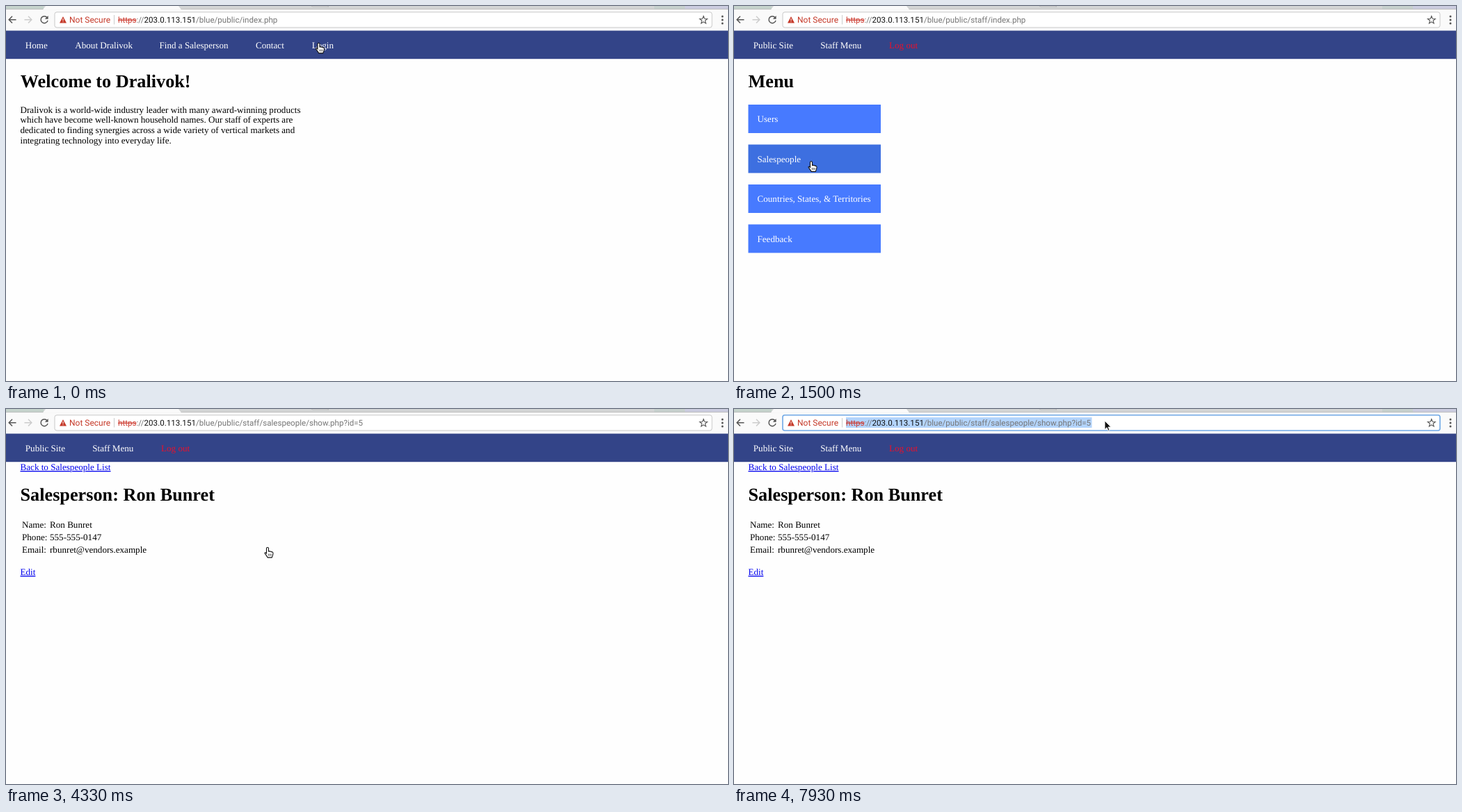
Write an HTML page that moves like this. It is 1038 by 540 pixels and loops after 8 s.

```html
<!DOCTYPE html>
<html lang="en">
<head>
<meta charset="utf-8">
<title>Staff site walkthrough</title>
<style>
  html, body { margin: 0; width: 100%; height: 100%; overflow: hidden; background: #fefefe; }
  svg { display: block; width: 1038px; height: 540px; }
  text { font: 13.12px "Liberation Serif", "Times New Roman", serif; text-rendering: geometricPrecision; white-space: pre; }
  .h1 { font-size: 26.24px; font-weight: bold; }
  .th { font-weight: bold; text-anchor: middle; }
  .nav { fill: #fff; }
  .out { fill: #e8112d; }
  .link { fill: #00e; text-decoration: underline; }
  .ui { font: 11.6px Roboto, "Liberation Sans", sans-serif; fill: #757575; }
  .ui .bad { fill: #cc3a2f; text-decoration: line-through; }
  .ui .host { fill: #111; }
  .warn { font-size: 12px; fill: #c53929; }
</style>
</head>
<body>
<svg id="stage" viewBox="0 0 1038 540"></svg>
<script>
const stage = document.getElementById('stage');
const text = (x, y, s, cls = '') => `<text x="${x}" y="${y}" class="${cls}">${s}</text>`;
const rect = (x, y, w, h, fill, extra = '') =>
  `<rect x="${x}" y="${y}" width="${w}" height="${h}" fill="${fill}" ${extra}/>`;
const line = (d, color, width = 1.5) => `<path d="${d}" fill="none" stroke="${color}" stroke-width="${width}"/>`;
const group = (id, body) => `<g id="${id}">${body}</g>`;

const star = Array.from({ length: 10 }, (_, i) => {
  const r = i % 2 ? 2.5 : 5.8, a = i * Math.PI / 5;
  return `${1002.8 + r * Math.sin(a)},${20.3 - r * Math.cos(a)}`;
}).join(' ');

const toolbar =
  rect(0, 0, 1038, 36, '#fafafa') +
  rect(0, 0, 1038, 4.5, '#d3d5d5') + rect(0, 0, 54, 4.5, '#c5d3cc') +
  rect(932, 0, 44, 4.5, '#c6d0cd') + rect(976, 0, 62, 4.5, '#cbccdf') +
  line('M0 4.6H1038', '#b4b4b4', .8) +
  '<path d="M53 5.2L57 0H248L252 5.2z" fill="#fafafa"/>' +
  '<path d="M439 0H462L464 1H441z" fill="#eee" stroke="#aaa" stroke-width=".6"/>' +
  line('M14.5 19.7H4.5M9 14.8L4.2 19.7L9 24.6', '#555') +
  line('M26.5 19.7H36.5M32 14.8L36.8 19.7L32 24.6', '#ccc') +
  line('M59 16.5A5 5 0 1 0 60 20.8', '#555') +
  '<path d="M60.6 14V18.8H55.8z" fill="#555"/>' +
  rect(70, 8.8, 945, 22.2, '#fff', 'id="field" rx="3" stroke="#c8c8c8"') +
  rect(161, 12, 353.5, 15, '#b3d4fc', 'id="urlSel"') +
  '<path d="M82 15L87 24.5H77z" fill="#c53929"/>' + line('M82 18V21.3M82 22.3V23.3', '#fff', 1) +
  text(91, 24, 'Not Secure', 'ui warn') + line('M155.5 13V26.5', '#ccc', 1) +
  '<text x="161" y="24" class="ui"><tspan class="bad">https</tspan>://' +
  '<tspan class="host">203.0.113.151</tspan><tspan id="path"></tspan></text>' +
  `<polygon points="${star}" fill="none" stroke="#555" stroke-width="1.1"/>` +
  [15, 20, 25].map(y => `<circle cx="1030" cy="${y}" r="1.5" fill="#555"/>`).join('') +
  rect(0, 35.5, 1038, 40.7, '#334488');

const navBar = items => items.map(([x, s, cls = 'nav']) => text(x, 61, s, cls)).join('');
const staffNav = navBar([[27.8, 'Public Site'], [124.3, 'Staff Menu'], [223, 'Log out', 'out']]);

const home =
  navBar([[27.8, 'Home'], [99.3, 'About Dralivok'], [220.5, 'Find a Salesperson'], [359, 'Contact'], [439.7, 'Login']]) +
  text(20.8, 117, 'Welcome to Dralivok!', 'h1') +
  ['Dralivok is a world-wide industry leader with many award-winning products',
   'which have become well-known household names. Our staff of experts are',
   'dedicated to finding synergies across a wide variety of vertical markets and',
   'integrating technology into everyday life.'].map((s, i) => text(20.5, 153.5 + i * 14.8, s)).join('');

const menu = staffNav + text(20.5, 117, 'Menu', 'h1') +
  ['Users', 'Salespeople', 'Countries, States, &amp; Territories', 'Feedback'].map((s, i) =>
    rect(20.5, 142 + i * 57.5, 190.5, 41, '#477aff', 'class="button"') +
    text(33.5, 167 + i * 57.5, s, 'nav')).join('');

const people = [
  ['Ron', 'Bunret'], ['Celia', 'Fandig'], ['Byron', 'Druve'], ['Dexter', 'Quilstom'],
  ['Dorotea', 'Drelkoby'], ['Duncan', 'Dunsel'], ['Slow', 'Slowman (FIRED FOR STEALING)'],
  ['Fakey', 'McFakerston (NOT PUBLIC UNTIL SEPT. 1)'], ['Charlotte', 'Orlun'],
  ['Pam', 'Frolney'], ['Sylvie', 'Felvano']];

const list = staffNav + text(20.5, 117, 'Salespeople', 'h1') +
  text(20.5, 153.5, 'Add a Salesperson', 'link') +
  text(56.5, 185.5, 'First name', 'th') + text(228.5, 185.5, 'Last name', 'th') +
  people.map(([first, last], i) => {
    const y = 203.7 + i * 18.04;
    return text(23, y, first) + text(93.5, y, last) + text(366.7, y, 'Show', 'link') + text(403.7, y, 'Edit', 'link');
  }).join('');

const person = staffNav + text(20.5, 88, 'Back to Salespeople List', 'link') +
  rect(20.5, 108.5, 281.5, 30, '#b3d7fe', 'id="headSel"') +
  text(20.5, 132, 'Salesperson: Ron Bunret', 'h1') +
  [['Name:', 'Ron Bunret'], ['Phone:', '555-555-0147'], ['Email:', 'rbunret@vendors.example']]
    .map(([k, v], i) => text(23, 171 + i * 18, k) + text(63, 171 + i * 18, v)).join('') +
  text(20.5, 239, 'Edit', 'link');

const pointers = group('arrow',
    '<path d="M0 0v12.5l3-2.8 2 4.6 2-.9-2-4.4h4z" fill="#111" stroke="#fff" stroke-width=".9"/>') +
  group('hand',
    '<path d="M-1.5 1.2a1.5 1.5 0 0 1 3 0v4.3l1-.3 1.2.6 1.2-.2 1 .8h1.2q1 .4 .9 2l-.6 3-1.2 3h-6l-1.6-2.5-2.4-3.3q-.6-1.6 1.2-1.2l1.1 1z" fill="#fff" stroke="#111" stroke-width="1.1"/>' +
    line('M1.4 9v3M3.3 9v3M5.2 9v3', '#111', .7)) +
  group('beam', line('M-2 -7Q0 -7 0 -5V5Q0 7 -2 7M2 -7Q0 -7 0 -5V5Q0 7 2 7', '#222', 1));

stage.innerHTML = rect(0, 0, 1038, 540, '#fefefe') + toolbar +
  group('home', home) + group('menu', menu) + group('list', list) + group('person', person) +
  group('pointer', pointers);

const $ = id => document.getElementById(id);
const show = (id, on) => $(id).style.display = on ? '' : 'none';
const buttons = [...document.querySelectorAll('.button')];

// Each page: start time, id, path
const pages = [
  [0, 'home', '/blue/public/index.php'],
  [310, 'menu', '/blue/public/staff/index.php'],
  [1940, 'list', '/blue/public/staff/salespeople/index.php'],
  [4180, 'person', '/blue/public/staff/salespeople/show.php?id=5']];

// Each move: start time, number of steps, step length, target x and y, upward bend
const moves = [
  [760, 6, 148, 111, 224, 0],
  [2980, 6, 150, 376, 199.5, 24],
  [5080, 3, 150, 303, 123, 0],
  [5530, 3, 150, -8.5, 119, 0],
  [6280, 2, 150, 352, 129, 0],
  [6880, 6, 150, 533, 17, 0]];

function pointerAt(t) {
  let x = 449.5, y = 53.5;
  for (const [start, steps, gap, toX, toY, bend] of moves) {
    if (t < start) break;
    const p = Math.min(1, (Math.floor((t - start) / gap) + 1) / steps);
    const e = p * p * (3 - 2 * p);
    x += (toX - x) * e;
    y += (toY - y) * e - bend * Math.sin(Math.PI * p);
  }
  return [x, y];
}

function draw(t) {
  const page = pages.filter(p => t >= p[0]).pop();
  pages.forEach(p => show(p[1], p === page));
  $('path').textContent = page[2];

  const [x, y] = pointerAt(t);
  let overButton = false;
  buttons.forEach((b, i) => {
    const top = 142 + i * 57.5;
    const over = page[1] === 'menu' && x > 20 && x < 211 && y > top && y < top + 41;
    overButton = overButton || over;
    b.setAttribute('fill', over ? '#3d6fe0' : '#477aff');
  });

  const kind = t < 470 || overButton || (t >= 1500 && t < 2090) || (t >= 3730 && t < 5080) ? 'hand'
    : t >= 5380 && t < 5830 ? 'beam' : 'arrow';
  ['arrow', 'hand', 'beam'].forEach(k => show(k, k === kind));
  $('pointer').setAttribute('transform', `translate(${x} ${y})`);

  const left = Math.max(20.5, Math.min(302, x));
  const selStart = t < 5830 ? left : 20.5;
  show('headSel', t >= 5530 && t < 6880);
  $('headSel').setAttribute('x', selStart);
  $('headSel').setAttribute('width', 302 - selStart);

  show('urlSel', t >= 7930);
  $('field').setAttribute('stroke', t >= 7780 ? '#6fa8e6' : '#c8c8c8');
  $('field').setAttribute('stroke-width', t >= 7780 ? 1.6 : 1);
}

const begin = performance.now();
function tick() {
  draw((performance.now() - begin) % 8000);
  requestAnimationFrame(tick);
}
tick();
</script>
</body>
</html>
```
